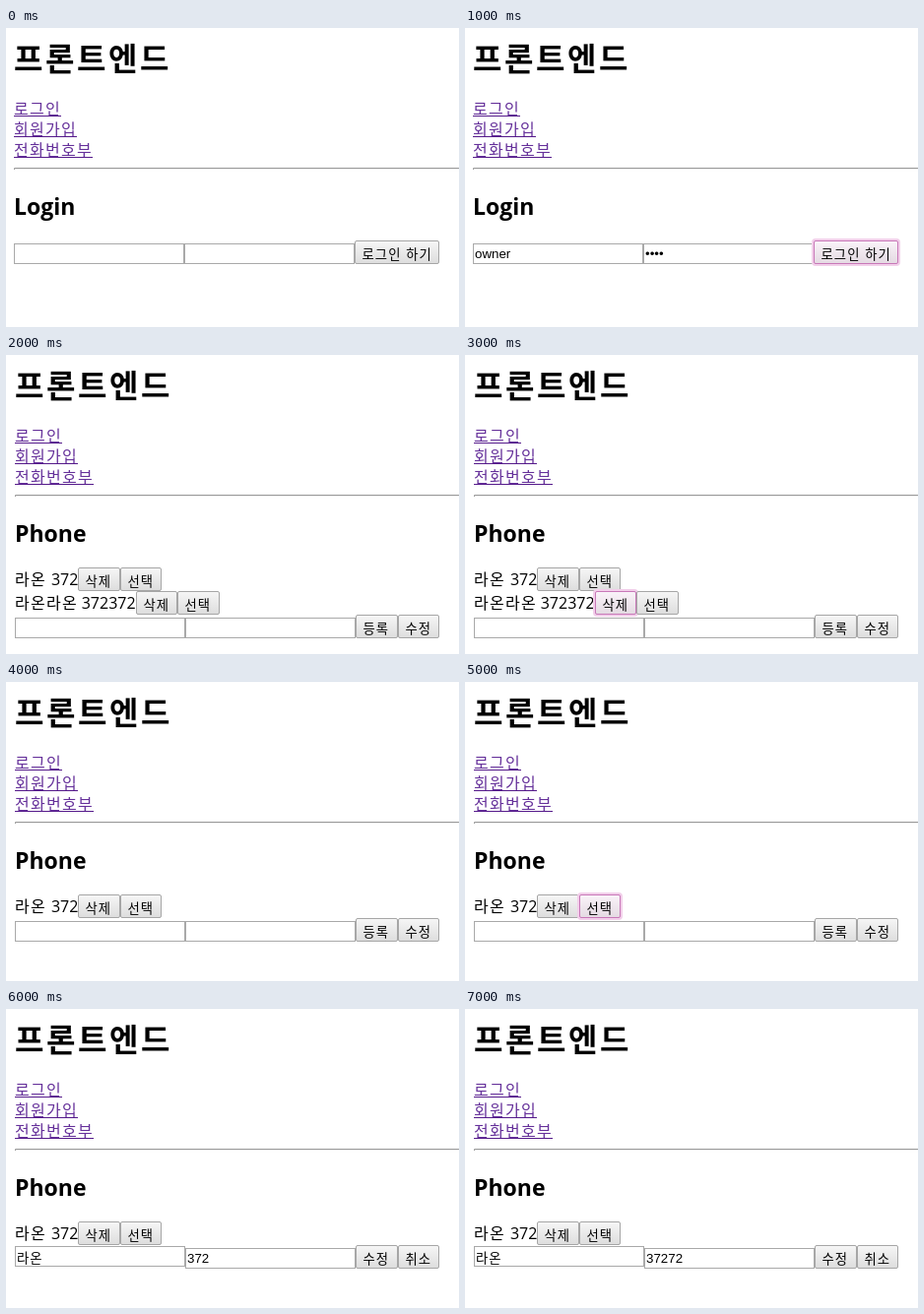
An HTML page that plays this animation: 460 px wide and 304 px high, repeating every 8 s.

```html
<!DOCTYPE html>
<html lang="ko">
<head>
<meta charset="utf-8">
<title>프론트엔드</title>
<style>
  html, body { margin: 0; width: 100%; height: 100%; overflow: hidden; background: #fff; }
  svg { display: block; }
  text { white-space: pre; }
  .ko { font-family: "Noto Sans CJK KR", "Noto Sans CJK", sans-serif; letter-spacing: .08em; }
  .title { font-size: 32px; font-weight: 700; }
  .body { font-size: 16px; font-weight: 300; }
  .link { fill: #65309a; }
  .small { font-size: 13.333px; font-weight: 300; }
  .heading { font: 700 23px "Open Sans", sans-serif; }
  .digits { font: 16px "Open Sans", sans-serif; text-anchor: end; }
  .field { font: 13.333px "Liberation Sans", Arial, sans-serif; }
</style>
</head>
<body>
<svg id="stage" width="460" height="304" viewBox="0 0 460 304">
  <defs>
    <linearGradient id="face" x2="0" y2="1">
      <stop stop-color="#f6f6f6"/><stop offset="1" stop-color="#dddddd"/>
    </linearGradient>
    <linearGradient id="faceFocus" x2="0" y2="1">
      <stop stop-color="#faf3f9"/><stop offset="1" stop-color="#e4dae2"/>
    </linearGradient>
  </defs>
  <g id="page"></g>
</svg>
<script>
const STEP = 1000, STEPS = 8;
const BASELINE = 18;   // shared by everything in a row, from the row's top
const BUTTON = 42.5;   // width of a two-syllable button, before snapping to pixels
const NAME = '라온', NUMBER = '372';
const page = document.getElementById('page');

const text = (x, y, cls, s) => `<text x="${x}" y="${y}" class="${cls}">${s}</text>`;
const box = (x, y, w, h, attrs) =>
  `<rect x="${x}" y="${y}" width="${w}" height="${h}" ${attrs}/>`;

function button(x, top, label, focused, width = BUTTON) {
  const left = Math.round(x), w = Math.round(x + width) - left;
  const glow = focused
    ? box(left - .5, top - .5, w + 1, 25, 'rx="2.5" fill="none" stroke="#f2cfea" stroke-width="3"') : '';
  const style = focused
    ? 'fill="url(#faceFocus)" stroke="#c878b8"'
    : 'fill="url(#face)" stroke="#a6a6a6"';
  return glow + box(left + .5, top + .5, w - 1, 23, 'rx="1.5" ' + style) +
    text(left + 7.5, top + BASELINE + 1, 'ko small', label);
}

// The taller Korean font lifts its box by two pixels.
function input(x, top, value = '', korean = false) {
  return box(x + .5, top + (korean ? 1.5 : 3.5), 172, 20, 'fill="#fff" stroke="#a9a9a9"') +
    text(x + 2, top + BASELINE, korean ? 'ko small' : 'field', value);
}

function header(x, heading) {
  const links = ['로그인', '회원가입', '전화번호부'].map((label, i) =>
    text(x, 88 + 21 * i, 'ko body link', label) +
    box(x, 89 + 21 * i, 16 * label.length, 1, 'fill="#551a8b"'));
  return text(x, 43, 'ko title', '프론트엔드') + links.join('') +
    box(x, 143, 460 - x, 1, 'fill="#eeeeee"') +
    `<path d="M${x + .5} 144V142.5H460" fill="none" stroke="#9a9a9a"/>` +
    text(x, 190, 'heading', heading);
}

function login(filled) {
  return header(8, 'Login') +
    input(8, 216, filled ? 'owner' : '') +
    input(181, 216, filled ? '••••' : '') +
    button(354, 216, '로그인 하기', filled, 86);
}

// One contact: the number ends where its first button begins.
function contact(top, name, number, end, focus) {
  return text(9, top + BASELINE, 'ko body', name) +
    text(end, top + BASELINE, 'digits', number) +
    button(end, top, '삭제', focus === '삭제') +
    button(end + BUTTON, top, '선택', focus === '선택');
}

function phone(step) {
  const two = step < 4, editing = step > 5;
  const top = two ? 264 : 240;
  const [first, second] = editing ? ['수정', '취소'] : ['등록', '수정'];
  const number = editing ? NUMBER + (step === 7 ? '72' : '') : '';
  return header(9, 'Phone') +
    contact(216, NAME, NUMBER, 73.4, step === 5 && '선택') +
    (two ? contact(240, NAME + NAME, NUMBER + NUMBER, 131.6, step === 3 && '삭제') : '') +
    input(9, top, editing ? NAME : '', editing) +
    input(182, top, number) +
    button(355, top, first) + button(355 + BUTTON, top, second);
}

let shown = -1;
const start = performance.now();
function tick() {
  const step = Math.floor((performance.now() - start) / STEP) % STEPS;
  if (step !== shown) {
    shown = step;
    page.innerHTML = step < 2 ? login(step === 1) : phone(step);
  }
  requestAnimationFrame(tick);
}
tick();
</script>
</body>
</html>
```
